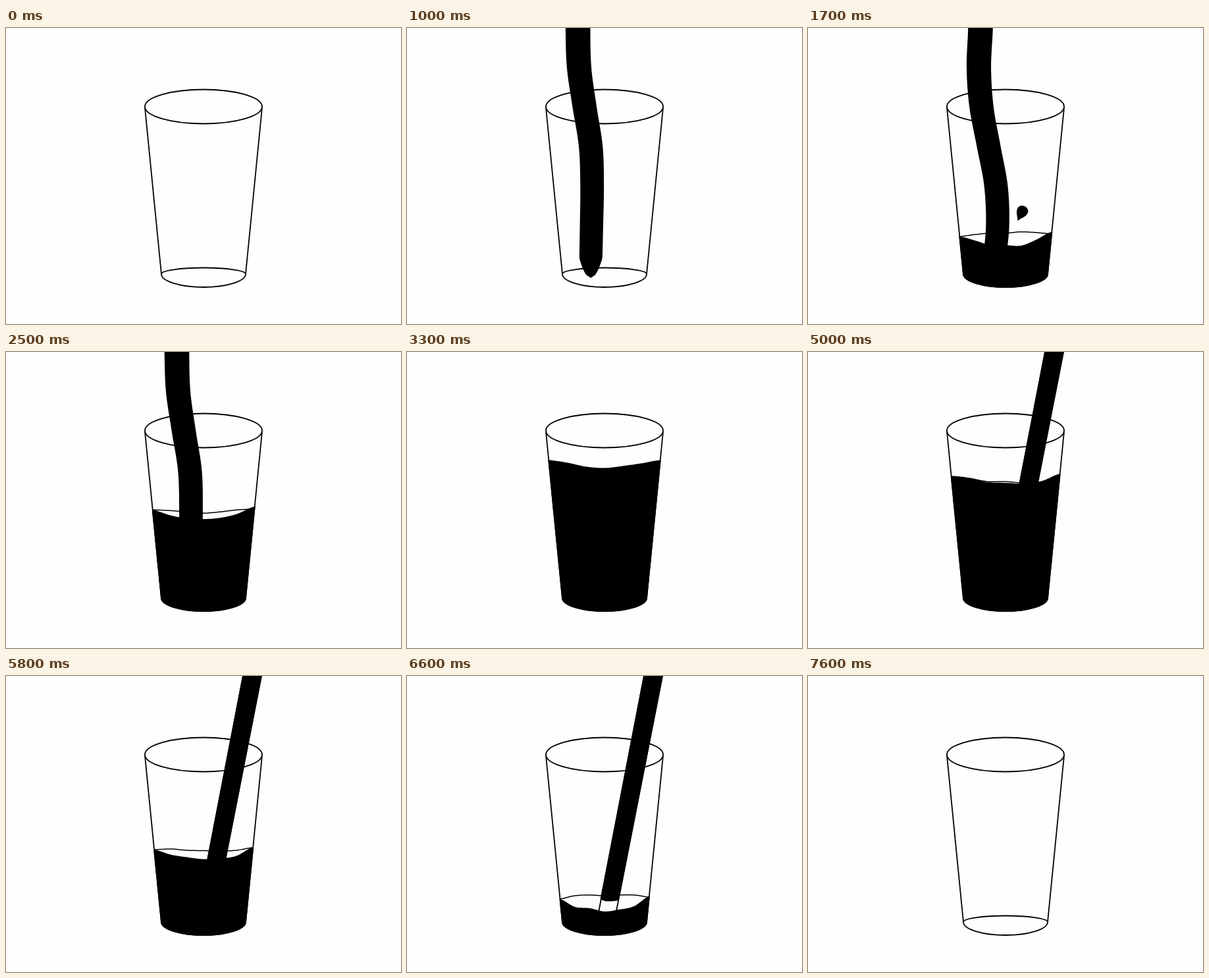
An HTML page with a canvas for the animation above (8 s loop, 600 by 450 pixels).

```html
<!DOCTYPE html>
<html lang="en">
<head>
<meta charset="utf-8">
<title>Glass filling and emptying</title>
<style>
  html, body { margin: 0; width: 100%; height: 100%; overflow: hidden; background: #fefdff; }
  canvas { display: block; width: 600px; height: 450px; }
</style>
</head>
<body>
<canvas id="stage"></canvas>
<script>
const LOOP = 8000, STEP = 100, W = 600, H = 450;
const PAPER = '#fefdff', INK = '#000';
const canvas = document.getElementById('stage');
const scale = window.devicePixelRatio || 1;
canvas.width = W * scale;
canvas.height = H * scale;
const ctx = canvas.getContext('2d');

// Surface poses: time, level at the left wall, front and back edge offsets.
const still = [0, 4, 10, 12, 9, 5, 0];
const calm = [0, 3, 9, 10, 11, 8, -3];
const calmBack = [0, 3, 8, 8, 10, 8, -3];
const low = [0, 3, 5, 6, 5, 3, 0];
const flat = [0, 0, 0, 0, 0, 0, 0];
const poses = [
  [1000, 388, low, flat],
  [1700, 317, [0, 6, 13, 13, 14, 5, -7], [0, -3, -5, -5, -7, -6, -4]],
  [2500, 240, [0, 8, 13, 14, 12, 6, -5], [0, 1, 3, 5, 3, 0, -1]],
  [3300, 165, still, still],
  [3500, 164, still, still],
  [3800, 164, still, still],
  [4700, 164, calm, calmBack],
  [5000, 189, calm, calmBack],
  [6600, 339, [0, 12, 14, 19, 16, 11, -4], [0, -5, -6, -5, -6, -6, -3]],
  [7100, 390, low, flat]
];

// Centre line of the poured stream, every 60 px, at both ends of its sway.
const swayA = [262, 259.5, 263.5, 274.5, 285.5, 288, 283];
const swayB = [259.5, 261.5, 270, 279.3, 281, 280, 279];

const clamp = v => Math.max(0, Math.min(1, v));
const mix = (a, b, k) => a + (b - a) * k;
const mixAll = (a, b, k) => a.map((v, i) => mix(v, b[i], k));
const span = (t, from, to) => clamp((t - from) / (to - from));
const wallX = y => 211 + 25 * (Math.min(y, 374) - 121) / 253;

// Smooth value through evenly spaced samples; u runs over the indices.
function curve(list, u) {
  const last = list.length - 1;
  const i = Math.max(0, Math.min(last - 1, Math.floor(u)));
  const f = u - i;
  const at = j => list[Math.max(0, Math.min(last, j))];
  const [a, b, c, d] = [at(i - 1), at(i), at(i + 1), at(i + 2)];
  return b + f / 2 * (c - a + f * (2 * a - 5 * b + 4 * c - d + f * (3 * (b - c) + d - a)));
}

function line(points) {
  ctx.beginPath();
  points.forEach(([x, y]) => ctx.lineTo(x, y));
}

function poseAt(t) {
  if (t <= poses[0][0] || t >= poses[poses.length - 1][0]) return null;
  const i = poses.findIndex(p => p[0] > t);
  const a = poses[i - 1], b = poses[i], k = span(t, a[0], b[0]);
  return { level: mix(a[1], b[1], k), front: mixAll(a[2], b[2], k), back: mixAll(a[3], b[3], k) };
}

function edge(level, offsets) {
  const left = wallX(level), points = [];
  for (let i = 0; i <= 48; i++) {
    points.push([mix(left, W - left, i / 48), level + curve(offsets, i / 8)]);
  }
  return points;
}

function glassBody(grow) {
  ctx.beginPath();
  ctx.moveTo(211 - grow, 121);
  ctx.lineTo(236 - grow, 374);
  ctx.ellipse(300, 374, 64 + grow, 20 + grow, 0, Math.PI, 0, true);
  ctx.lineTo(389 + grow, 121);
}

function drawGlass() {
  glassBody(0);
  ctx.stroke();
  ctx.beginPath();
  ctx.ellipse(300, 374, 64, 9.5, 0, Math.PI, 0);
  ctx.stroke();
  ctx.beginPath();
  ctx.ellipse(300, 119.5, 89, 26, 0, 0, Math.PI * 2);
  ctx.stroke();
}

function inGlass(draw) {
  ctx.save();
  glassBody(1);
  ctx.clip();
  draw();
  ctx.restore();
}

function drawStream(t) {
  const tip = 380 * Math.pow(span(t, 200, 900), 1.3);
  const tail = 190 * span(t, 2900, 3250);
  if (tip <= 0 || tail >= 190) return;
  const sway = 0.5 - 0.5 * Math.cos(Math.PI * (t - 1700) / 800);
  const centre = mixAll(swayA, swayB, sway);
  const left = [], right = [];
  for (let i = 0; i <= 80; i++) {
    const y = mix(tail, tip, i / 80);
    let half = mix(18.8, 17.4, y / 380) * Math.sqrt(clamp((tip - y) / 30));
    if (tail > 0) half *= Math.sqrt(clamp((y - tail) / 30));
    const x = curve(centre, y / 60);
    left.push([x - half, y]);
    right.unshift([x + half, y]);
  }
  line(left.concat(right));
  ctx.fill();
}

function drawDrop(t) {
  if (t < 1500 || t > 2000) return;
  const s = (t - 1700) / 1000;
  const vy = -170 + 1800 * s;
  ctx.save();
  ctx.translate(326 + 90 * s, 279 - 170 * s + 900 * s * s);
  ctx.rotate(Math.atan2(vy, 90) + Math.PI / 2);
  ctx.beginPath();
  ctx.moveTo(0, 16);
  ctx.bezierCurveTo(-4, 9, -9, 6, -9, -1);
  ctx.bezierCurveTo(-9, -11, 8, -11, 8, -1);
  ctx.bezierCurveTo(8, 6, 3, 9, 0, 16);
  ctx.fill();
  ctx.restore();
}

const strawL = y => 360 - 0.192 * y;
const strawR = y => 388 - 0.196 * y;

function drawStraw(t) {
  const end = 380 * span(t, 3700, 4500);
  const start = 380 * (1 - Math.pow(1 - span(t, 6900, 7600), 3));
  if (end > start) {
    line([[strawL(start), start], [strawL(end), end]]);
    ctx.stroke();
    line([[strawR(start), start], [strawR(end), end]]);
    ctx.stroke();
    ctx.beginPath();
    ctx.ellipse((strawL(end) + strawR(end)) / 2, end, 13, 3, 0, 0, Math.PI);
    ctx.stroke();
  }
  // Liquid inside the straw
  const top = 380 - 380 * span(t, 4500, 4950);
  const bottom = 380 * (1 - Math.pow(span(t, 6500, 7000), 1.43));
  if (bottom <= top || bottom <= 0) return;
  const l = strawL(bottom) - 0.8, r = strawR(bottom) + 0.8;
  ctx.beginPath();
  ctx.moveTo(strawL(top) - 0.8, top);
  ctx.lineTo(l, bottom - 3);
  ctx.quadraticCurveTo((l + r) / 2 - 6, bottom + 3, r, bottom - 1);
  ctx.lineTo(strawR(top) + 0.8, top);
  ctx.fill();
}

function drawBody(pose) {
  const front = edge(pose.level, pose.front);
  line([[180, front[0][1]], ...front, [420, front[48][1]], [420, 420], [180, 420]]);
  ctx.fill();
}

function draw(t) {
  ctx.setTransform(scale, 0, 0, scale, 0, 0);
  ctx.fillStyle = PAPER;
  ctx.fillRect(0, 0, W, H);
  ctx.fillStyle = ctx.strokeStyle = INK;
  ctx.lineWidth = 1.8;
  ctx.lineJoin = 'round';

  const pose = poseAt(t);
  drawGlass();
  if (pose) inGlass(() => {
    line(edge(pose.level, pose.back));
    ctx.lineWidth = 1.5;
    ctx.stroke();
  });
  drawStraw(t);
  drawStream(t);
  drawDrop(t);
  if (pose) inGlass(() => drawBody(pose));
}

const began = performance.now();
function tick() {
  const t = (performance.now() - began) % LOOP;
  draw(Math.floor(t / STEP) * STEP);
  requestAnimationFrame(tick);
}
tick();
</script>
</body>
</html>
```
